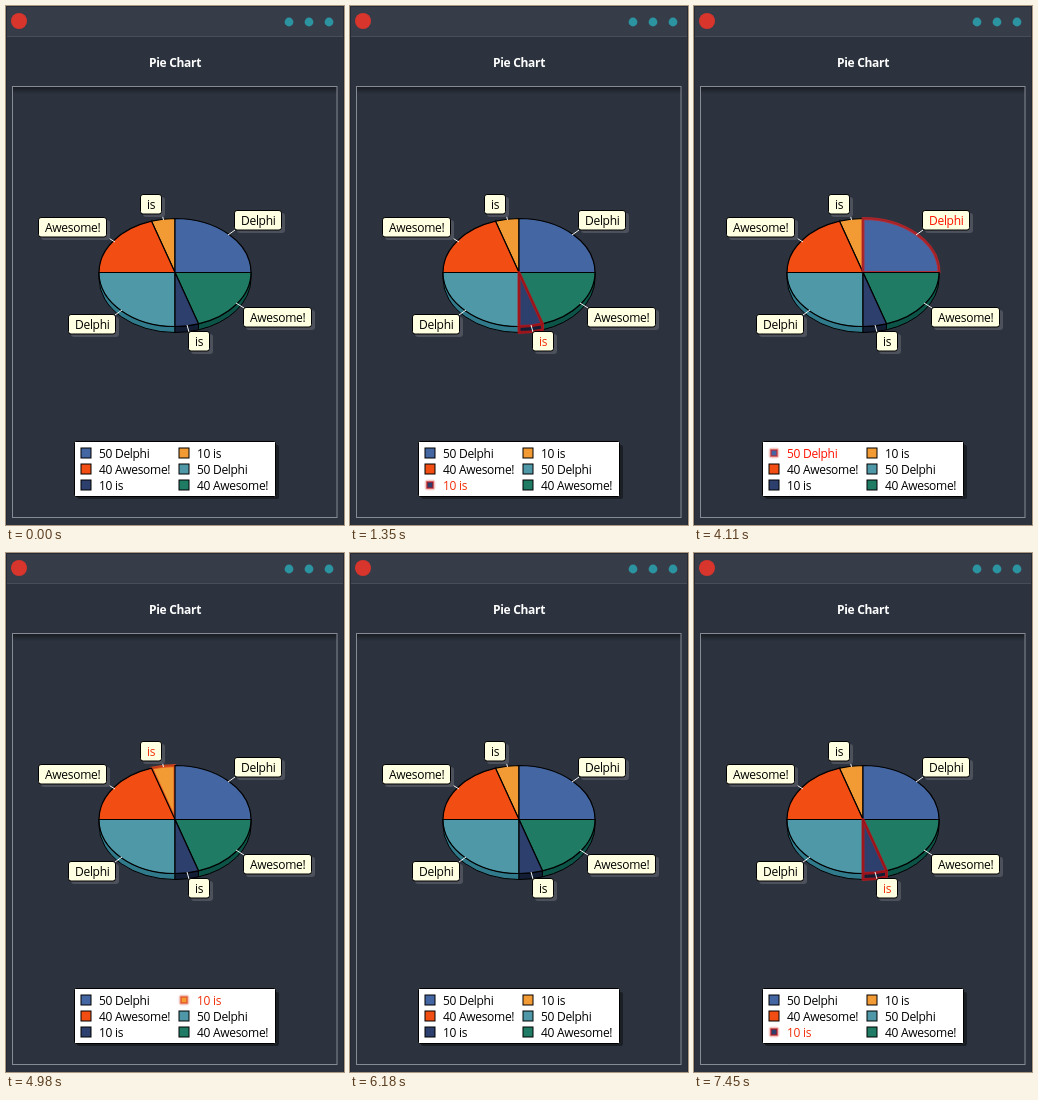
These frames come from a looping animation (338x519 px, 8000 ms). An HTML page:

```html
<!DOCTYPE html>
<html lang="en">
<head>
<meta charset="utf-8">
<title>Pie Chart</title>
<style>
  html, body { margin: 0; width: 100%; height: 100%; overflow: hidden; background: #2c333e; }
  svg { display: block; width: 338px; height: 519px; }
  text { font: 12px "Open Sans", "Noto Sans", sans-serif; letter-spacing: -.3px; fill: currentColor; }
  .title { font-weight: 700; color: #fff; text-anchor: middle; }
  .slice { --on: 0; --hot: #ff1200; --edge: #c4262a; color: #000; animation: 8s step-end infinite; }
  .hot { opacity: var(--on); }
  .blue { animation-name: blue; }
  .orange { --hot: #f0300a; --edge: #e2481c; animation-name: orange; }
  .red { animation-name: red; }
  .teal { animation-name: teal; }
  .navy { --hot: #f0300a; --edge: #b8161c; animation-name: navy; }
  .green { --hot: #ff0a00; animation-name: green; }
  @keyframes teal {
    0%, 16.875% { --on: 0; color: #000; }
    6.25% { --on: 1; color: var(--hot); }
  }
  @keyframes navy {
    0%, 31.5% { --on: 0; color: #000; }
    16.875%, 93.125% { --on: 1; color: var(--hot); }
  }
  @keyframes green {
    0%, 51.375% { --on: 0; color: #000; }
    31.5% { --on: 1; color: var(--hot); }
  }
  @keyframes blue {
    0%, 62.25%, 87.75% { --on: 0; color: #000; }
    51.375%, 83.125% { --on: 1; color: var(--hot); }
  }
  @keyframes orange {
    0%, 69.375% { --on: 0; color: #000; }
    62.25% { --on: 1; color: var(--hot); }
  }
  @keyframes red {
    0%, 77.25%, 93.125% { --on: 0; color: #000; }
    69.375%, 87.75% { --on: 1; color: var(--hot); }
  }
</style>
</head>
<body>
<svg viewBox="0 0 338 519">
  <defs>
    <linearGradient id="shade" x2="0" y2="1">
      <stop stop-color="#15181e" stop-opacity=".85"/>
      <stop offset="1" stop-color="#15181e" stop-opacity="0"/>
    </linearGradient>
  </defs>
  <rect width="338" height="519" fill="#2c333e"/>
  <rect width="338" height="30" fill="#363c48"/>
  <path d="M0 30.5H338" stroke="#474d59"/>
  <path d="M.5 519V.5H337.5V519" fill="none" stroke="#242933"/>
  <circle cx="13" cy="15" r="8" fill="#d8352c"/>
  <g fill="#2c93a1">
    <circle cx="283" cy="16" r="4.4"/>
    <circle cx="303" cy="16" r="4.4"/>
    <circle cx="323" cy="16" r="4.4"/>
  </g>
  <text class="title" x="169" y="61">Pie Chart</text>
  <rect x="7" y="81" width="324" height="7" fill="url(#shade)"/>
  <rect x="6.5" y="80.5" width="324.5" height="431" fill="none" stroke="#858a93"/>
  <g id="pie" stroke-linejoin="round"></g>
  <g id="labels"></g>
  <rect x="71" y="439" width="202" height="54" rx="2" fill="#14171d" opacity=".75"/>
  <rect x="68.5" y="435.5" width="201" height="55" rx="1" fill="#fff" stroke="#000"/>
  <g id="legend"></g>
</svg>
<script>
  const CX = 169, CY = 266.5, RX = 76, RY = 54, DEPTH = 6;

  // from/to: degrees clockwise from the top; box: label x, y, width; lead: leader line
  const slices = [
    { id: 'orange', name: 'is', value: 10, from: 342, to: 360, fill: '#f29a34',
      box: [134, 188, 22], lead: 'M156 208L157.5 214', key: [1, 0] },
    { id: 'red', name: 'Awesome!', value: 40, from: 270, to: 342, fill: '#f24d13',
      box: [32, 211, 69], lead: 'M101 231L109 236', key: [0, 1] },
    { id: 'blue', name: 'Delphi', value: 50, from: 0, to: 90, fill: '#4466a3',
      box: [228, 204, 48], lead: 'M229 224L222 229', key: [0, 0] },
    { id: 'teal', name: 'Delphi', value: 50, from: 180, to: 270, fill: '#4e98a8', wall: '#307a8b',
      box: [62, 308, 48], lead: 'M109 309L116 304', key: [1, 1] },
    { id: 'green', name: 'Awesome!', value: 40, from: 90, to: 162, fill: '#1f7b64', wall: '#0d5448',
      box: [237, 301, 69], lead: 'M238 302L230 297', key: [1, 2] },
    { id: 'navy', name: 'is', value: 10, from: 162, to: 180, fill: '#2d3f6c', wall: '#131e35',
      box: [182, 325, 22], lead: 'M183 326L181 319', key: [0, 2] }
  ];

  const point = (deg, drop = 0) => {
    const a = deg * Math.PI / 180;
    return `${(CX + RX * Math.sin(a)).toFixed(2)} ${(CY - RY * Math.cos(a) + drop).toFixed(2)}`;
  };
  const arc = (deg, sweep, drop) => `A${RX} ${RY} 0 0 ${sweep} ${point(deg, drop)}`;
  const group = (s, inner) => `<g class="slice ${s.id}">${inner}</g>`;
  const fillGroup = (id, draw) => {
    document.getElementById(id).innerHTML = slices.map(s => group(s, draw(s))).join('');
  };

  fillGroup('pie', ({ from, to, fill, wall }) => {
    const top = `M${CX} ${CY}L${point(from)}${arc(to, 1)}Z`;
    const side = wall ? `M${point(from)}${arc(to, 1)}L${point(to, DEPTH)}${arc(from, 0, DEPTH)}Z` : '';
    return `<path d="${side}" fill="${wall || 'none'}" stroke="#000"/>
      <path d="${top}" fill="${fill}" stroke="#000" stroke-width="1.2"/>
      <path class="hot" d="${top}${side}" fill="none" stroke="var(--edge)" stroke-opacity=".84" stroke-width="3"/>`;
  });

  fillGroup('labels', ({ name, box: [x, y, w], lead }) =>
    `<path d="${lead}" stroke="#f2f2f2"/>
     <rect x="${x + 3}" y="${y + 3}" width="${w}" height="20" rx="3" fill="#4c515b"/>
     <rect x="${x + .5}" y="${y + .5}" width="${w - 1}" height="19.5" rx="2.5" fill="#ffffe1" stroke="#000"/>
     <text x="${x + 7}" y="${y + 15}">${name}</text>`);

  fillGroup('legend', ({ name, value, fill, key: [col, row] }) => {
    const x = 75 + 98 * col, y = 442 + 16 * row;
    return `<rect x="${x}" y="${y}" width="10" height="10" fill="${fill}" stroke="#000"/>
      <g class="hot">
        <rect x="${x - 1}" y="${y - 1}" width="12" height="12" fill="#fff"/>
        <rect x="${x}" y="${y}" width="10" height="10" rx="2" fill="#efb9b4" stroke="#f6dcd9"/>
        <rect x="${x + 2}" y="${y + 2}" width="6" height="6" fill="${fill}" stroke="var(--edge)" stroke-opacity=".75" stroke-width="1.5"/>
      </g>
      <text x="${x + 18}" y="${y + 10}">${value} ${name}</text>`;
  });
</script>
</body>
</html>
```
